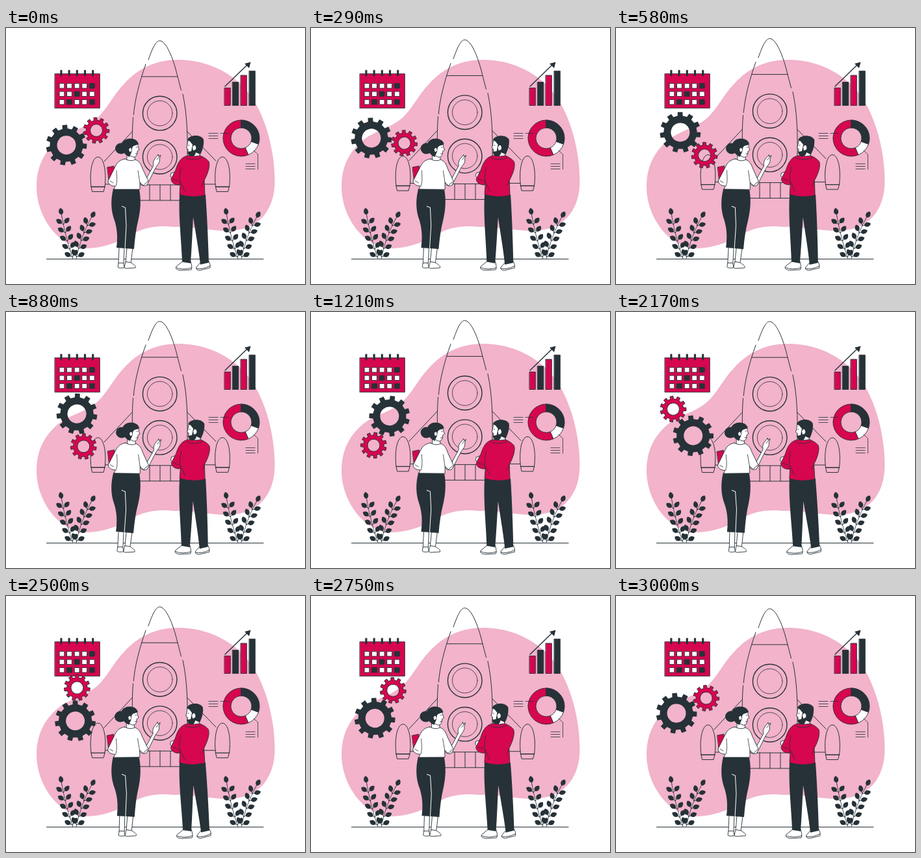
Animation, 460 px wide and 395 px high, one loop 3040 ms. Source, as an HTML page:

```html
<!DOCTYPE html>
<html lang="en">
<head>
<meta charset="utf-8">
<title>Rocket planning</title>
<style>
  html, body { margin: 0; width: 100%; height: 100%; overflow: hidden; background: #fff; }
  svg { display: block; }
  .line { fill: none; stroke: #263238; stroke-width: 1; stroke-linecap: round; stroke-linejoin: round; }
  .thin { stroke-width: .8; }
  .thick { stroke-width: 1.4; }
  .dark { fill: #263238; }
  .red { fill: #d6064f; }
  .white { fill: #fff; }
  .edge { stroke: #263238; stroke-width: .9; stroke-linejoin: round; stroke-linecap: round; }
</style>
</head>
<body>
<svg width="460" height="395" viewBox="0 0 460 395">
  <path fill="#f2b3cb" d="M265 49C310 49 352 70 376 104C400 137 413.500 191 413.500 236C413.500 282 388 313 340 313C312 313 285 305 258 307C232 304 216 308 200 315C180 325 160 339 124 340C82 340 47 292 47 245C47 212 60 190 80 173C100 157 128 154 146 133C160 117 168 100 181 87C204 61 232 49 265 49Z"/>

  <g id="calendar">
    <rect class="red edge" x="75.300" y="70.700" width="69" height="53"/>
  </g>

  <g id="chart">
    <path class="line thick" d="M337 90L371 57"/>
    <path class="dark" d="M376.500 52.500L374 62L367 55Z"/>
    <g class="edge">
      <rect class="red" x="336.300" y="92.500" width="9" height="27"/>
      <rect class="dark" x="348.700" y="83.500" width="9" height="36"/>
      <rect class="red" x="361.300" y="73" width="9" height="46.500"/>
      <rect class="dark" x="374.300" y="66.300" width="9" height="53.200"/>
    </g>
  </g>

  <g id="donut">
    <g class="edge">
      <path class="red" d="M362 142A28 28 0 1 0 373 195.700L368.300 184.700A16 16 0 1 1 362 154Z"/>
      <path class="dark" d="M362 142A28 28 0 0 1 388.300 179.600L377 175.500A16 16 0 0 0 362 154Z"/>
      <path class="white" d="M388.300 179.600A28 28 0 0 1 373 195.700L368.300 184.700A16 16 0 0 0 377 175.500Z"/>
    </g>
    <path class="line thin" d="M330 162.500h12M312 162.500h14M312 166.500h14M312 170.500h14M381 189L387.500 195V218M369 209.500h14M369 213.500h14M369 217.500h14"/>
  </g>

  <g id="rocket" class="line">
    <path d="M219 49C226 29 231 19.700 236.500 19.700C246 19.700 257 45 264 75L269.500 96M272 102C279 134 279.500 170 279 200C279 220 276 232 271 242M215 56C205 84 198 112 196.300 134M195.500 138C194 160 194 180 195 195C196 215 199 230 203 242M208.500 75H264"/>
    <g id="windows"></g>
    <path d="M203 242H270V266H203ZM221 242V266M237 242V266M253 242V266"/>
    <path d="M194 160L151 206M153 241H198M279 160L323 205M276 241H322"/>
    <g id="booster">
      <path d="M131 245C128 220 133 199 141.500 199C150 199 155 220 152 245L150 252.500H133Z"/>
      <path class="thick" d="M131 245H152"/>
    </g>
    <use href="#booster" x="191.500"/>
  </g>

  <g id="gears"></g>

  <path class="line" d="M62.500 356.500H396"/>
  <g id="plant"></g>
  <use href="#plant" x="254"/>

  <g id="woman">
    <path class="red edge" d="M156 215L166 213L168 237L159 240Z"/>
    <g class="white edge">
      <path d="M174 338L173 364H181L182 339ZM186 339L184 362L192 363L195 339Z"/>
      <path d="M173 363L172 369Q173 371 182 370L181 363ZM184 361C183 366 181 370 184 371L199 370C201 367 195 364 192 362Z"/>
    </g>
    <path class="dark" d="M165 248L205 249C208 265 207 280 204 294C200 310 198 326 197 341L170 339C172 322 171 310 167 297C161 281 161 265 165 248Z"/>
    <path fill="none" stroke="#fff" stroke-width="1" d="M178 275L183.500 277L185 305L183 341"/>
    <g class="white edge">
      <path d="M207 236L213 238L227 212C225 206 229 201 233 197L234 195L235 198L238 196L236 202C238 207 232 212 230 216L217 242Q212 246 206 240Z"/>
      <path d="M186 194L186 205L199 207L198 198Z"/>
      <path d="M183 202C177 203 172 206 169 212L157 236C157 241 162 244 168 244L166 249L206 249L206 238L211 243L219 236L210 217C207 208 204 205 199 203Q192 207 183 202Z"/>
      <path d="M188 180C195 173 204 175 203 183L205 188L202 190C202 196 200 200 195 199L187 195Z"/>
    </g>
    <path class="line thin" d="M169 244C172 235 170 228 170 220M206 239L203 220M160 236L165 239M200 184h1.500M199 194L202 193.500M232 203L236 198"/>
    <ellipse class="dark" cx="177" cy="186" rx="9" ry="8.500"/>
    <path class="dark" d="M178 180C180 168 201 167 204 179C200 182 195 180 194 186C194 192 191 195 190 199C183 196 178 190 178 180Z"/>
    <path class="white" d="M189 187q3-4 4 0t-3 4Z"/>
  </g>

  <g id="man">
    <g class="white edge">
      <path d="M272 360L262 368C260 372 263 373 268 374L285 373Q287 369 284 360ZM299 362L293 369Q291 373 298 374L314 370Q315 364 312 360Z"/>
      <path d="M262 370Q272 374 286 370M293 371Q303 373 314 367" fill="none"/>
    </g>
    <path class="dark" d="M267 256C265 290 270 330 271 361L284 363C286 335 287 310 288 292C292 318 297 345 299 365L312 362C311 325 309 285 307 257Z"/>
    <path class="white edge" d="M261 222L254 224L253 229L258 233L263 229Z"/>
    <path class="red edge" d="M276 198C268 201 264 209 261 219L254 233C254 240 262 243 268 242L267 257Q286 263 306 258L305 235C312 222 314 212 312 206C307 200 301 198 297 196L280 197Z"/>
    <path class="line thin" d="M277 201Q289 205 301 200M268 242C266 231 268 222 269 215M268 237L275 252M305 235L302 243M257 233L265 236"/>
    <path class="white edge" d="M281 172C278 177 280 181 277.500 185L280 187L280 192L290 198L298 197L298 178Z"/>
    <path class="dark" d="M279 173C282 164 300 164 304 172C305 181 302 189 299 195L292 192C291 200 281 201 279 191L285 190L287 180L283 175Z"/>
    <path class="white" d="M287 184q3-6 5-1t-4 6Z"/>
    <path class="line" d="M281 181h1"/>
  </g>
</svg>
<script>
  const LOOP = 3040, FPS = 24, CYCLE = 72;
  const byId = id => document.getElementById(id);

  function add(parent, tag, attrs) {
    const el = document.createElementNS('http://www.w3.org/2000/svg', tag);
    for (const key in attrs) el.setAttribute(key, attrs[key]);
    return parent.appendChild(el);
  }

  // Calendar rings and days
  const calendar = byId('calendar');
  for (let i = 0; i < 5; i++)
    add(calendar, 'rect', { class: 'dark', x: 83.300 + i * 12.200, y: 64.500, width: 3.200, height: 10, rx: 1.600 });
  ['wwwwd', 'wwdww', 'wdwwd'].forEach((row, r) => [...row].forEach((day, c) =>
    add(calendar, 'rect', {
      class: (day === 'd' ? 'dark' : 'white') + ' edge',
      x: 82.300 + c * 11.600, y: 85.500 + r * 12.500, width: 7.500, height: 7.500
    })));

  // Rocket portholes
  for (const cy of [131.6, 199])
    for (const r of [26.300, 19.300])
      add(byId('windows'), 'circle', { cx: 236.700, cy, r, class: r > 20 ? 'thick' : 'thin' });

  function gearPath(teeth, outer, root, hole) {
    const step = 2 * Math.PI / teeth, points = [];
    for (let i = 0; i < teeth; i++)
      for (const [r, part] of [[root, -.270], [outer, -.210], [outer, .210], [root, .270]]) {
        const a = (i + part) * step - Math.PI / 2;
        points.push((r * Math.cos(a)).toFixed(2) + ' ' + (r * Math.sin(a)).toFixed(2));
      }
    return `M${points.join('L')}ZM${hole} 0A${hole} ${hole} 0 1 0 ${-hole} 0A${hole} ${hole} 0 1 0 ${hole} 0Z`;
  }

  function addGear(x, y, cls, ...shape) {
    add(byId('gears'), 'path', {
      class: cls, 'fill-rule': 'evenodd', d: gearPath(...shape), transform: `translate(${x} ${y}) rotate(-5)`
    });
  }
  addGear(93, 180.700, 'dark', 11, 31.500, 25.700, 14.500);
  addGear(139, 158, 'red edge', 11, 20, 15.800, 9.500);

  // Leaves in pairs along a curved stem, one at the tip
  function addStem(x0, y0, x1, y1, x2, y2, pairs) {
    const plant = byId('plant');
    add(plant, 'path', { class: 'line thin', d: `M${x0} ${y0}Q${x1} ${y1} ${x2} ${y2}` });
    const leaf = (x, y, angle) => {
      const transform = `translate(${x} ${y}) rotate(${angle})`;
      add(plant, 'path', { class: 'line thin', d: 'M0 0V-4', transform });
      add(plant, 'path', { class: 'dark', d: 'M0-3C-5-5-4.500-11 0-13.500C4.500-11 5-5 0-3Z', transform });
    };
    for (let i = 0; i < pairs; i++) {
      const t = .04 + .78 * i / (pairs - 1), u = 1 - t;
      const x = u * u * x0 + 2 * u * t * x1 + t * t * x2;
      const y = u * u * y0 + 2 * u * t * y1 + t * t * y2;
      const dx = u * (x1 - x0) + t * (x2 - x1), dy = u * (y1 - y0) + t * (y2 - y1);
      const lean = Math.atan2(dx, -dy) * 180 / Math.PI;
      leaf(x, y, lean - 42);
      leaf(x, y, lean + 52);
    }
    leaf(x2, y2, Math.atan2(x2 - x1, y1 - y2) * 180 / Math.PI);
  }
  addStem(103, 356, 92, 325, 86, 291, 5);
  addStem(108, 356, 115, 322, 130, 295, 5);

  function draw(time) {
    const step = Math.min(CYCLE, Math.floor((time % LOOP + 4.990) * FPS / 1000));
    const turn = step / CYCLE;
    const move = (id, value) => byId(id).setAttribute('transform', value);
    const lift = 7 * Math.abs(Math.sin(Math.PI * turn)) ** 1.300;
    const sway = .75 * Math.sin(2 * Math.PI * turn);
    move('gears', `rotate(${step * 4.990} 110.1 175.1)`);
    move('rocket', `translate(0 ${-lift})`);
    move('woman', `rotate(${sway} 185 268)`);
    move('man', `rotate(${sway} 288 268)`);
  }

  const start = performance.now();
  function tick() {
    draw(performance.now() - start);
    requestAnimationFrame(tick);
  }
  tick();
</script>
</body>
</html>
```
